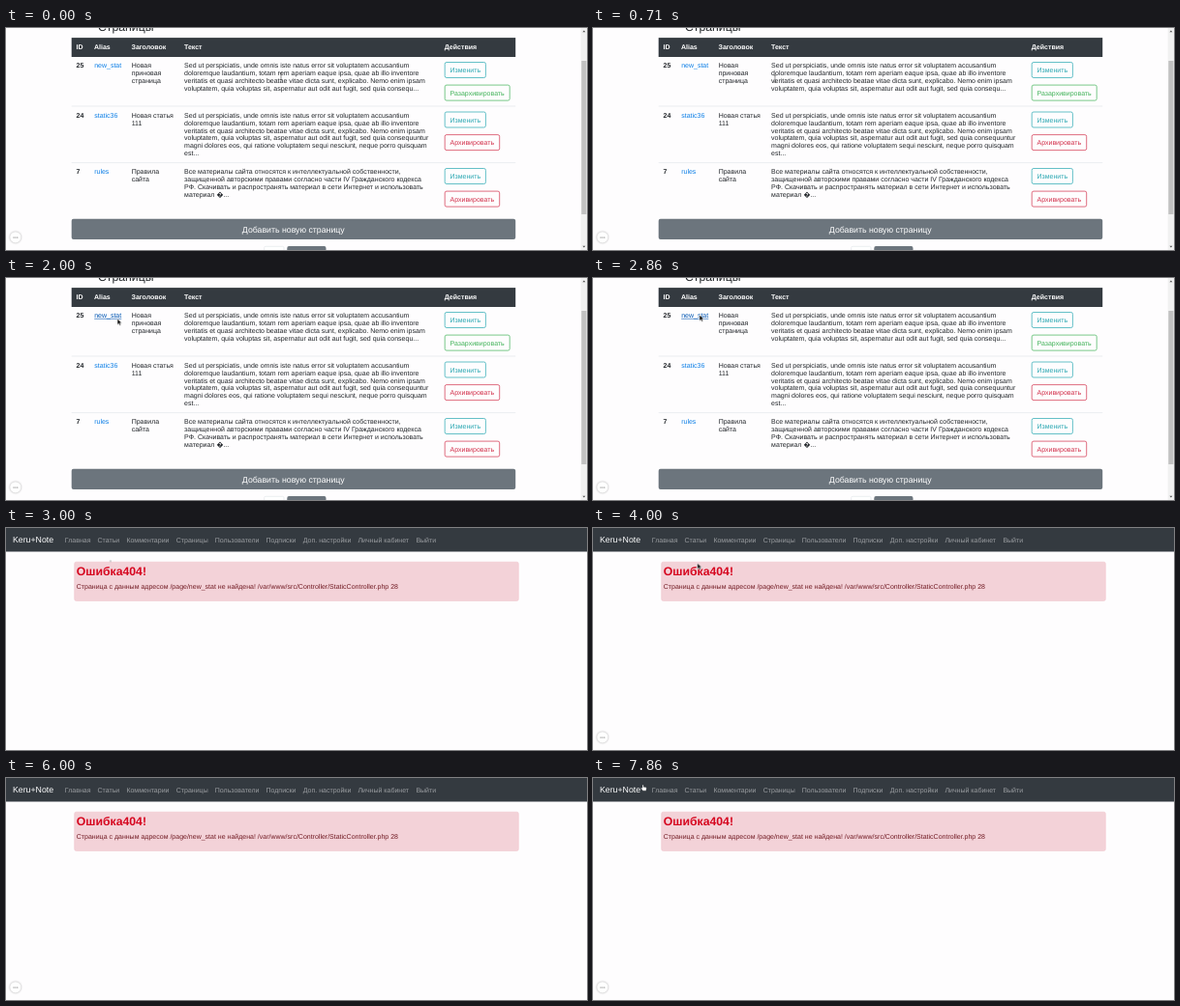
Recreate the animation shown at these times as an HTML page. Size 600 px wide and 230 px high, loop 8000 ms.

```html
<!DOCTYPE html>
<html lang="ru">
<head>
<meta charset="utf-8">
<title>Страницы</title>
<style>
html, body { margin: 0; width: 100%; height: 100%; overflow: hidden; background: #fefdfe; }
svg { display: block; width: 600px; height: 230px; }
text { font: 7px "Liberation Sans", Arial, sans-serif; fill: #212529; text-rendering: geometricPrecision; white-space: pre; }
.bold { font-weight: 700; }
.white { fill: #fff; }
.link { fill: #0a7ee6; }
.h3 { font-size: 12.25px; }
.big { font-size: 8.75px; }
.nav { fill: #9a9da0; }
.mid { text-anchor: middle; }

/* One shared 8 s timeline */
.t { animation: 8s step-end infinite; }
#list { animation-name: list; }
#error { animation-name: error; }
#hover { animation-name: hover; }
#bubble { animation-name: bubble; }
#bubble circle { filter: drop-shadow(0 .5px 1px rgba(0, 0, 0, .35)); }
#pointer { animation-name: move; }
#beam { animation-name: beam; }
#arrow { animation-name: arrow; }
#speck { animation-name: speck; }
#hand { animation-name: hand; }

@keyframes list { 0% { opacity: 1 } 37.45%, 100% { opacity: 0 } }
@keyframes error { 0% { opacity: 0 } 37.45%, 100% { opacity: 1 } }
@keyframes hover { 0% { opacity: 0 } 24.9%, 100% { opacity: 1 } }
@keyframes bubble {
  0% { opacity: 1 }
  37.45% { opacity: 0 }
  44.6% { opacity: .25 }
  46.4% { opacity: .55 }
  48.2% { opacity: .8 }
  49.95%, 100% { opacity: 1 }
}
@keyframes move {
  0% { transform: translate(284px, 50px); animation-timing-function: steps(8) }
  14.2% { transform: translate(130.2px, 54.2px); animation-timing-function: steps(8) }
  28.6% { transform: translate(110px, 38.2px) }
  37.45% { transform: translate(107.7px, 36.4px) }
  96.35% { transform: translate(90px, 40.5px) }
  98.2%, 100% { transform: translate(51px, 7px) }
}
@keyframes beam { 0% { opacity: 1 } 10.6%, 100% { opacity: 0 } }
@keyframes arrow {
  0% { opacity: 0 }
  10.6% { opacity: 1 }
  37.45% { opacity: 0 }
  44.6% { opacity: 1 }
  74.95% { opacity: 0 }
  96.35% { opacity: 1 }
  98.2%, 100% { opacity: 0 }
}
@keyframes speck { 0% { opacity: 0 } 37.45% { opacity: 1 } 44.6%, 100% { opacity: 0 } }
@keyframes hand { 0% { opacity: 0 } 98.2%, 100% { opacity: 1 } }
</style>
</head>
<body>
<svg viewBox="0 0 600 230">
  <rect width="600" height="230" fill="#fefdfe"/>

  <g id="list" class="t">
    <text class="h3" x="95" y="3.4">Страницы</text>
    <rect x="67.7" y="10.1" width="458.5" height="19.9" fill="#343a40"/>
    <path d="M67.7 81H526.2M67.7 139.6H526.2" stroke="#dee2e6" stroke-width=".6"/>
    <g id="rows"></g>
    <g id="hover" class="t">
      <rect x="90" y="34" width="31" height="10" fill="#fefdfe"/>
      <text x="91.2" y="41.4" style="fill:#0056b3">new_stat</text>
      <path d="M91.2 42.3H119.3" stroke="#0056b3" stroke-width=".6"/>
    </g>
    <rect x="67.7" y="197.8" width="458.5" height="21.2" rx="2" fill="#6c757d"/>
    <text class="big white mid" x="296.8" y="211.7">Добавить новую страницу</text>
    <rect x="266.7" y="226.3" width="20.3" height="12" rx="1.5" fill="#fff" stroke="#dee2e6" stroke-width=".6"/>
    <rect x="290.3" y="226.1" width="40.2" height="12" rx="1.8" fill="#6c757d"/>
    <rect x="593.7" width="6.3" height="230" fill="#f1f1f1"/>
    <rect x="594.3" y="34" width="5.1" height="159" fill="#c1c1c1"/>
    <path d="M595.4 4.2h3l-1.5-1.8zM595.4 225.8h3l-1.5 1.8z" fill="#505050"/>
  </g>

  <g id="error" class="t">
    <rect width="600" height="24.5" fill="#343a40"/>
    <text class="big white" x="7" y="15.3">Keru+Note</text>
    <g id="menu"></g>
    <rect x="70.7" y="35.2" width="458.6" height="40.3" rx="1.8" fill="#f3d2d8" stroke="#eec0c8" stroke-width=".5"/>
    <text class="h3 bold" x="72.7" y="48.8" style="fill:#d6061f">Ошибка404!</text>
    <text x="72.8" y="63.4" style="fill:#721c24">Страница с данным адресом /page/new_stat не найдена! /var/www/src/Controller/StaticController.php 28</text>
  </g>

  <g id="bubble" class="t">
    <circle cx="9.8" cy="216.8" r="5.6" fill="#fff"/>
    <path d="M8 217h.01M9.9 217h.01M11.8 217h.01" stroke="#555" stroke-width="1.1" stroke-linecap="round"/>
  </g>

  <g id="pointer" class="t">
    <path id="beam" class="t" d="M-1.3-3.5H1.3M0-3.5V3.5M-1.3 3.5H1.3" fill="none" stroke="#444" stroke-width=".6"/>
    <path id="arrow" class="t" d="M0 0V6.2L1.5 4.9L2.5 7.1L3.6 6.6L2.6 4.5L4.6 4.4Z" fill="#0a0a0a" stroke="#fff" stroke-width=".5"/>
    <rect id="speck" class="t" x="-.4" y="-3" width="1.2" height="1.8" fill="#aaa"/>
    <path id="hand" class="t" d="M0 .4Q.6-.5 1.2 .4V2.3L3.4 2.6Q4.4 2.8 4.3 3.8L3.8 6.2H.6L-1.7 3.5Q-1.2 2.7 0 3.5Z" fill="#fff" stroke="#22262a" stroke-width=".3"/>
  </g>
</svg>

<script>
const NS = "http://www.w3.org/2000/svg";
const LINE = 7.85;

function add(parent, tag, attrs, content = "") {
  const el = document.createElementNS(NS, tag);
  for (const key in attrs) el.setAttribute(key, attrs[key]);
  el.textContent = content;
  return parent.appendChild(el);
}

function lines(parent, x, y, list, cls = "") {
  list.forEach((s, i) => add(parent, "text", { x, y: y + i * LINE, class: cls }, s));
}

function button(parent, y, label, width, color) {
  add(parent, "rect", { x: 453.2, y, width, height: 16, rx: 1.8, fill: "#fefdfe", stroke: color, "stroke-width": .7 });
  add(parent, "text", { x: 458.5, y: y + 10.5, style: `fill:${color}` }, label);
}

const columns = [[72.5, "ID"], [91, "Alias"], [129.5, "Заголовок"], [184, "Текст"], [452.8, "Действия"]];
const archive = ["Архивировать", 56.5, "#d22f4a"];
const lorem = [
  "Sed ut perspiciatis, unde omnis iste natus error sit voluptatem accusantium",
  "doloremque laudantium, totam rem aperiam eaque ipsa, quae ab illo inventore",
  "veritatis et quasi architecto beatae vitae dicta sunt, explicabo. Nemo enim ipsam"
];
const pages = [
  { y: 41.4, id: "25", alias: "new_stat", title: ["Новая", "приновая", "страница"],
    body: [...lorem, "voluptatem, quia voluptas sit, aspernatur aut odit aut fugit, sed quia consequ..."],
    action: ["Разархивировать", 67, "#3fb257"] },
  { y: 92.9, id: "24", alias: "static36", title: ["Новая статья", "111"],
    body: [...lorem, "voluptatem, quia voluptas sit, aspernatur aut odit aut fugit, sed quia consequuntur",
      "magni dolores eos, qui ratione voluptatem sequi nesciunt, neque porro quisquam", "est..."],
    action: archive },
  { y: 151.4, id: "7", alias: "rules", title: ["Правила", "сайта"],
    body: ["Все материалы сайта относятся к интеллектуальной собственности,",
      "защищенной авторскими правами согласно части IV Гражданского кодекса",
      "РФ. Скачивать и распространять материал в сети Интернет и использовать",
      "материал \uFFFD..."],
    action: archive }
];

const rows = document.getElementById("rows");
for (const [x, label] of columns) add(rows, "text", { x, y: 22.1, class: "bold white" }, label);
for (const p of pages) {
  lines(rows, 72.5, p.y, [p.id], "bold");
  lines(rows, 91.2, p.y, [p.alias], "link");
  lines(rows, 129.7, p.y, p.title);
  lines(rows, 184.1, p.y, p.body);
  button(rows, p.y - 5.9, "Изменить", 42.2, "#25a6b0");
  button(rows, p.y + 17.7, ...p.action);
}

const menu = document.getElementById("menu");
const items = [[60.8, "Главная"], [94.5, "Статьи"], [124.4, "Комментарии"], [175.8, "Страницы"],
  [215.8, "Пользователи"], [268.5, "Подписки"], [306.8, "Доп. настройки"], [363.4, "Личный кабинет"], [423.4, "Выйти"]];
for (const [x, label] of items) add(menu, "text", { x, y: 14.8, class: "nav" }, label);
</script>
</body>
</html>
```
